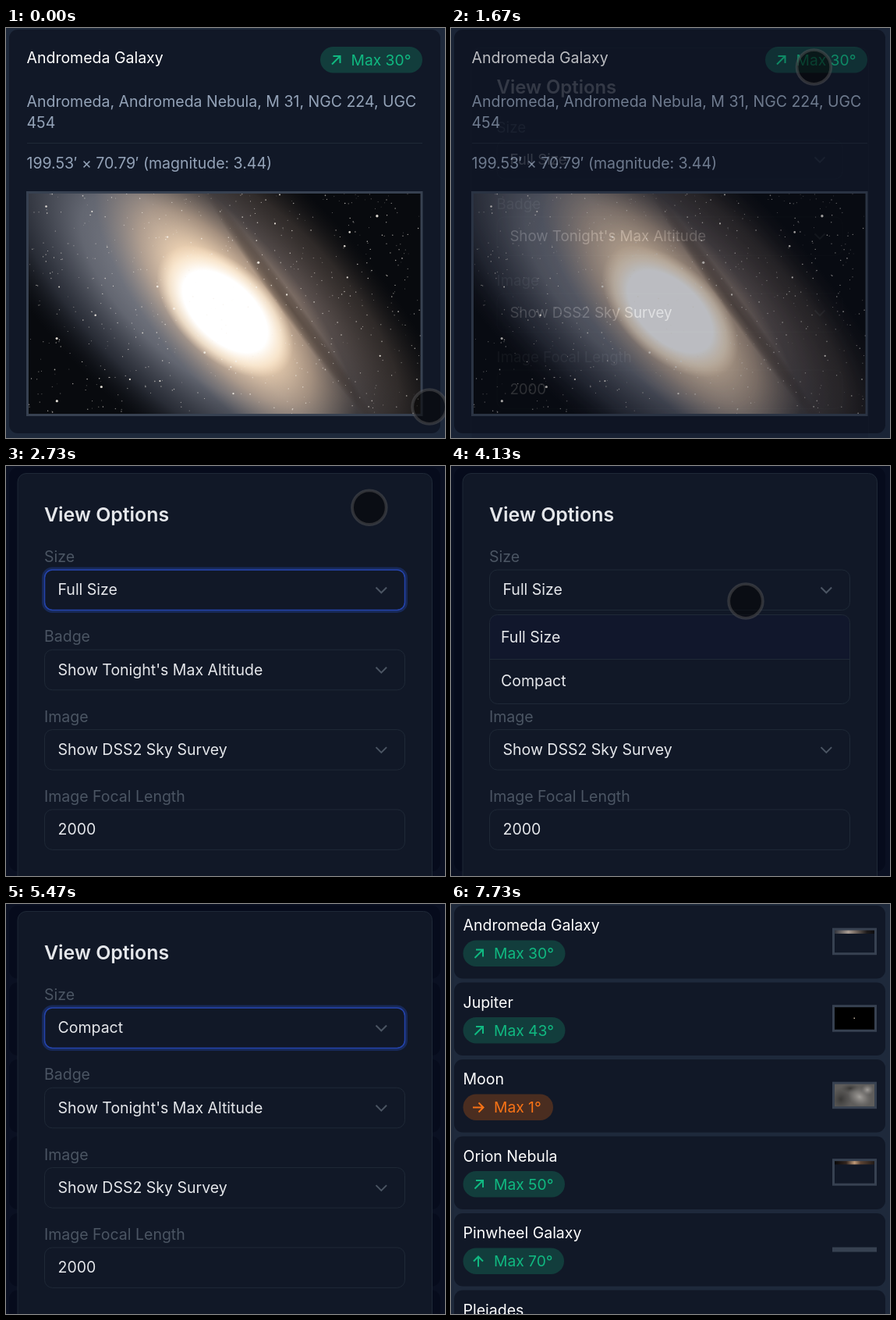
An HTML page that plays this animation: 563 px wide and 525 px high, repeating every 7.87 s.

```html
<!DOCTYPE html>
<html lang="en">
<head>
<meta charset="utf-8">
<title>View options</title>
<style>
  html, body { margin: 0; width: 100%; height: 100%; overflow: hidden; background: #1e293b; }
  svg { display: block; width: 100%; height: 100%; }
  text { font: 400 19.5px Inter, sans-serif; fill: #fff; }
  .muted { fill: #94a3b8; }
  .label { fill: #4b5563; }
  .field { fill: #e5e7eb; }
  .tag { font-size: 19.25px; }
  .heading { font-size: 24.9px; font-weight: 600; fill: #e5e7eb; }
  .card, .panel { fill: #111827; }
  .line { stroke: #1f2937; }
  .frame { fill: none; stroke: #374151; stroke-width: 3; }
  .icon { fill: none; stroke-width: 2; }
</style>
</head>
<body>
<svg id="stage" viewBox="0 0 563 525"></svg>
<script>
const LOOP = 7870, STEP = 200 / 3;
const stage = document.getElementById('stage');

const text = (x, y, s, cls = '') => `<text x="${x}" y="${y}" class="${cls}">${s}</text>`;
const rect = (x, y, w, h, attrs = '') =>
  `<rect x="${x}" y="${y}" width="${w}" height="${h}" ${attrs}/>`;

// ---- gradients and photos ----
const stops = list => list.map(([at, color, alpha]) =>
  `<stop offset="${at}" stop-color="${color}" stop-opacity="${alpha}"/>`).join('');
const radial = (id, list) => `<radialGradient id="${id}">${stops(list)}</radialGradient>`;
const linear = (id, list) => `<linearGradient id="${id}">${stops(list)}</linearGradient>`;
const glow = (id, x, y, rx, ry, turn) =>
  `<ellipse rx="${rx}" ry="${ry}" fill="url(#${id})" transform="translate(${x} ${y}) rotate(${turn})"/>`;

const defs = `<defs>
  ${radial('disc', [[0, '#a3a4ac', .9], [.45, '#868a97', .72], [.75, '#555b6c', .42], [1, '#20242f', 0]])}
  ${radial('warm', [[0, '#75635a', .7], [.6, '#564a43', .5], [1, '#2a2420', 0]])}
  ${radial('dust', [[0, '#2a201b', .5], [.6, '#2a201b', .3], [1, '#2a201b', 0]])}
  ${radial('halo', [[0, '#ffedd6', 1], [.4, '#f3d6b5', .92], [.65, '#cfb297', .65], [1, '#a08c7c', 0]])}
  ${radial('core', [[0, '#fff', 1], [.62, '#fff', 1], [.82, '#fff0da', .7], [1, '#ffe6c8', 0]])}
  ${radial('bright', [[0, '#aaa7a3', .9], [.5, '#8d8a87', .6], [1, '#777', 0]])}
  ${radial('shade', [[0, '#343332', .9], [1, '#444', 0]])}
  ${linear('galaxyStrip', [[0, '#2b2e38', 1], [.35, '#a89b92', 1], [.5, '#7d7068', 1], [.8, '#1d1a1b', 1], [1, '#0a0a0d', 1]])}
  ${linear('nebulaStrip', [[0, '#050506', 1], [.3, '#33251e', 1], [.5, '#c09a78', 1], [.65, '#5d4434', 1], [1, '#1d1714', 1]])}
  <clipPath id="photo">${rect(28, 211, 505, 284)}</clipPath>
  <clipPath id="moon">${rect(491, 230, 53, 31)}</clipPath>
</defs>`;

function randomizer(seed) {
  return () => (seed = (seed * 16807) % 2147483647) / 2147483647;
}

function stars() {
  const rnd = randomizer(31);
  let out = '';
  for (let i = 0; i < 650; i++) {
    const big = i < 26;
    const r = big ? .9 + rnd() * .8 : .35 + rnd() * .5;
    const alpha = big ? .9 : .3 + rnd() * .5;
    out += `<circle cx="${(29 + rnd() * 503).toFixed(1)}" cy="${(212 + rnd() * 282).toFixed(1)}" ` +
      `r="${r.toFixed(2)}" fill="#f4eee6" opacity="${alpha.toFixed(2)}"/>`;
  }
  return out;
}

const galaxy = `<g clip-path="url(#photo)">
  ${rect(28, 211, 505, 284, 'fill="#080a0e"')}
  ${glow('disc', 232, 345, 390, 162, 44)}
  ${glow('warm', 375, 345, 310, 100, 50)}
  ${glow('halo', 282, 357, 238, 92, 50)}
  ${glow('dust', 368, 362, 190, 12, 54)}
  ${glow('core', 281, 363, 106, 60, 43)}
  ${stars()}</g>`;

// ---- card and list ----
const ARROWS = {
  upRight: 'M15 22.5L25 12.5M16.5 12H25.5V21',
  right: 'M12.5 17H26M20 11L26 17L20 23',
  up: 'M19.5 24V11M13.5 17L19.5 11L25.5 17'
};
const GREEN = ['#123d3c', '#10b981'], ORANGE = ['#4a2d20', '#f97316'];

const badge = (x, y, w, label, arrow, [back, ink]) => `<g transform="translate(${x} ${y})">
  ${rect(0, 0, w, 33.5, `rx="16.75" fill="${back}"`)}
  <path d="${ARROWS[arrow]}" class="icon" stroke="${ink}"/>
  <text x="39.5" y="23.7" class="tag" style="fill:${ink}">${label}</text></g>`;

const fullView = rect(4, 2, 553, 517, 'rx="11" class="card"') +
  text(26.5, 45, 'Andromeda Galaxy') +
  badge(403, 24, 131, 'Max 30°', 'upRight', GREEN) +
  text(26.5, 101, 'Andromeda, Andromeda Nebula, M 31, NGC 224, UGC', 'muted') +
  text(26.5, 128, '454', 'muted') +
  '<path d="M27 147.5H534" class="line"/>' +
  text(26.5, 180, '199.53′ × 70.79′ (magnitude: 3.44)', 'muted') +
  galaxy + rect(27.5, 210.5, 505.5, 285, 'class="frame"');

const ROWS = [
  ['Andromeda Galaxy', 131, 'Max 30°', 'upRight', GREEN],
  ['Jupiter', 131, 'Max 43°', 'upRight', GREEN],
  ['Moon', 115.5, 'Max 1°', 'right', ORANGE],
  ['Orion Nebula', 130.5, 'Max 50°', 'upRight', GREEN],
  ['Pinwheel Galaxy', 129.5, 'Max 70°', 'up', GREEN],
  ['Pleiades', 131, 'Max 62°', 'upRight', GREEN]
];
const rowTop = i => 2 + 98.5 * i;
const row = ([name, ...tag], i) => rect(4, rowTop(i), 553, 93.5, 'rx="11" class="card"') +
  text(15.5, rowTop(i) + 32, name) + badge(15.5, rowTop(i) + 44.5, ...tag);

const thumbFrame = i => rect(490.5, rowTop(i) + 30.2, 54, 31.5, 'class="frame"');
const emptyThumb = (i, id = '') => rect(489, rowTop(i) + 43.5, 57, 6, `fill="#374151" id="${id}"`);
const loadedThumb = (i, id, fill) => `<g id="${id}">
  ${rect(491, rowTop(i) + 31, 53, 5, `fill="url(#${fill})"`)}${thumbFrame(i)}</g>`;

const moon = `<g clip-path="url(#moon)">${rect(490, 229, 55, 33, 'fill="#5f5d5b"')}
  ${glow('shade', 500, 250, 14, 16, 20)}${glow('shade', 512, 236, 12, 6, 0)}
  ${glow('bright', 524, 247, 16, 12, 30)}${glow('bright', 534, 238, 8, 7, 0)}</g>`;

const listView = ROWS.map(row).join('') +
  emptyThumb(0, 'galaxyEmpty') + loadedThumb(0, 'galaxyThumb', 'galaxyStrip') +
  rect(491, rowTop(1) + 30, 53, 32, 'fill="#000"') +
  rect(516.5, rowTop(1) + 45, 1.5, 1.5, 'fill="#c9b8a4"') + thumbFrame(1) +
  moon + thumbFrame(2) +
  emptyThumb(3, 'nebulaEmpty') + loadedThumb(3, 'nebulaThumb', 'nebulaStrip') +
  emptyThumb(4);

// ---- dialog ----
function field(label, value, i, id = '') {
  const y = 102.3 * i;
  const chevron = i < 3
    ? `<path d="M474.5 ${155.5 + y}l6.8 6.8l6.8-6.8" class="icon" stroke="#4b5563"/>` : '';
  return text(49, 123 + y, label, 'label') +
    rect(49.5, 133 + y, 462, 51.5, 'rx="10" class="panel line"') +
    `<text id="${id}" x="66.5" y="${165.3 + y}" class="field">${value}</text>` + chevron;
}

const dialog = rect(15, 9.5, 531.5, 772, 'rx="11" class="panel line"') +
  text(49, 71, 'View Options', 'heading') +
  field('Size', 'Full Size', 0, 'size') +
  field('Badge', 'Show Tonight\'s Max Altitude', 1) +
  field('Image', 'Show DSS2 Sky Survey', 2) +
  field('Image Focal Length', '2000', 3) +
  `<g id="ring" fill="none">
    ${rect(48, 131.5, 465, 54.5, 'rx="11.5" stroke="#1e3a8a" stroke-width="4" stroke-opacity=".5"')}
    ${rect(49.5, 133, 462, 51.5, 'rx="10" stroke="#2443ac" stroke-width="1.5"')}</g>
  <g id="menu">${rect(49.5, 190.5, 462, 114, 'rx="10" class="panel"')}
    <path id="active" fill="#11172c"/>
    ${rect(49.5, 190.5, 462, 114, 'rx="10" fill="none" class="line"')}
    <path d="M50 247.5H511" class="line"/>
    ${text(64, 226, 'Full Size', 'field')}${text(64, 282, 'Compact', 'field')}</g>`;

stage.innerHTML = defs + rect(0, 0, 563, 525, 'fill="#1e293b"') +
  `<g id="full">${fullView}</g><g id="list">${listView}</g>` +
  rect(0, 0, 563, 525, 'id="shadeAll" fill="#020617"') +
  `<g id="dialog">${dialog}</g>` +
  '<circle id="cursor" r="21.8" fill="#050505" fill-opacity=".55" stroke="#555557" stroke-opacity=".5" stroke-width="3.8"/>';

// ---- motion ----
const el = {};
stage.querySelectorAll('[id]').forEach(n => { el[n.id] = n; });
const show = (node, on) => node.setAttribute('display', on ? 'inline' : 'none');
const clamp = v => Math.max(0, Math.min(1, v));

function bezier(x1, y1, x2, y2) {
  const at = (a, b, u) => 3 * a * u * (1 - u) ** 2 + 3 * b * u * u * (1 - u) + u ** 3;
  return x => {
    let lo = 0, hi = 1;
    for (let i = 0; i < 24; i++) {
      const mid = (lo + hi) / 2;
      if (at(x1, x2, mid) < x) lo = mid; else hi = mid;
    }
    return at(y1, y2, hi);
  };
}
const easeOut = bezier(0, 0, .2, 1);
const easeIn = bezier(.4, 0, 1, 1);
const easeBoth = bezier(.4, 0, .4, 1);
const linearEase = x => x;

// time, x, y, easing towards this point
const PATH = [
  [0, 543, 485], [800, 464, 64, easeBoth], [1067, 465, 50, easeOut],
  [2667, 466, 50], [2733, 466, 53], [3467, 409, 152], [3533, 400, 164],
  [3867, 400, 164], [4133, 378, 173], [4467, 345, 262, easeBoth], [4600, 338, 275],
  [4733, 338, 275], [5267, 227, 477, easeBoth], [5400, 211, 526], [5467, 205, 560]
];

function cursorAt(t) {
  const i = PATH.findIndex(p => p[0] > t);
  if (i < 0) return PATH[PATH.length - 1].slice(1, 3);
  const [t0, x0, y0] = PATH[i - 1], [t1, x1, y1, ease = linearEase] = PATH[i];
  const k = ease((t - t0) / (t1 - t0));
  return [x0 + (x1 - x0) * k, y0 + (y1 - y0) * k];
}

const OPEN = 1653, CLOSE = 6320, MENU = 3730, PICK = 4660;

function render(t) {
  const picked = t >= PICK, menu = t >= MENU && !picked;
  show(el.full, !picked);
  show(el.list, picked);
  for (const [name, at] of [['galaxy', 7330], ['nebula', 7730]]) {
    show(el[name + 'Thumb'], t >= at);
    show(el[name + 'Empty'], t < at);
  }

  const p = t < CLOSE ? easeOut(clamp((t - OPEN) / 300)) : 1 - easeIn(clamp((t - CLOSE) / 200));
  const visible = t > OPEN && t < CLOSE + 200;
  show(el.dialog, visible);
  show(el.shadeAll, visible);
  el.shadeAll.setAttribute('opacity', .7 * p);
  el.dialog.setAttribute('opacity', p);
  el.dialog.setAttribute('transform', `translate(281 395) scale(${.95 + .05 * p}) translate(-281 -395)`);

  const [x, y] = cursorAt(t);
  el.size.textContent = picked ? 'Compact' : 'Full Size';
  show(el.ring, !menu);
  el.ring.setAttribute('opacity', easeOut(clamp((t - OPEN - 20) / 150)));
  show(el.menu, menu);
  el.active.setAttribute('d', y > 248
    ? 'M50 248H511V294Q511 304 501 304H60Q50 304 50 294Z'
    : 'M50 247V201Q50 191 60 191H501Q511 191 511 201V247Z');
  el.cursor.setAttribute('cx', x);
  el.cursor.setAttribute('cy', y);
  show(el.cursor, t < 5460);
}

// the picture advances 15 times a second
function tick() {
  const t = performance.now() % LOOP;
  render(Math.floor((t + 4) / STEP) * STEP + 1);
  requestAnimationFrame(tick);
}
tick();
</script>
</body>
</html>
```
